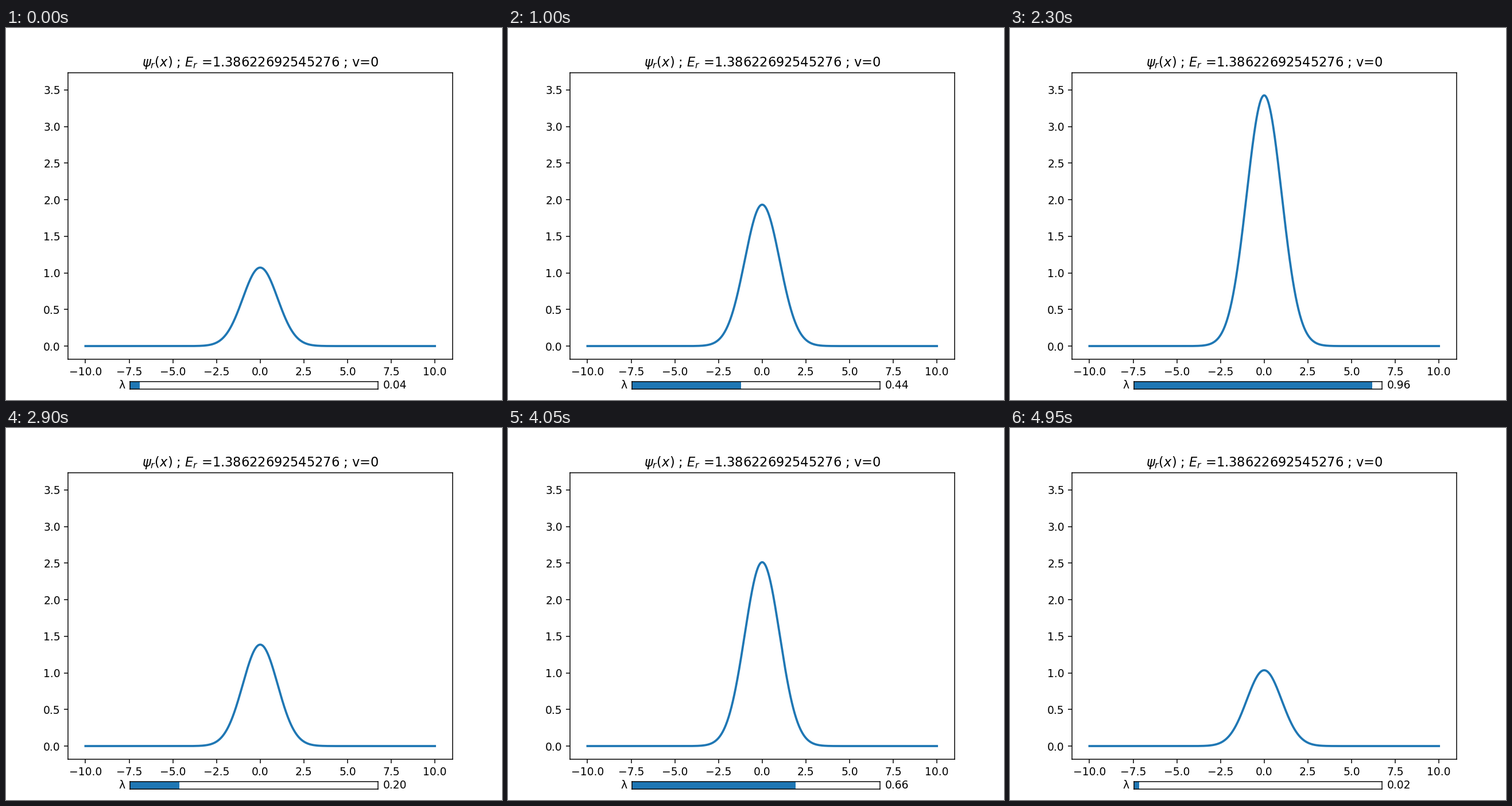
A matplotlib script for the animation above (5000 ms loop, 864 by 648 pixels).

```python
import numpy as np
import matplotlib.pyplot as plt
from matplotlib.animation import FuncAnimation

FRAMES, INTERVAL = 100, 50
SWEEP = 50  # frames per sweep of the coupling
SHIFT = np.sqrt(np.pi) / 2
ENERGY = "1.38622692545276"

plt.rcParams["font.family"] = "DejaVu Sans"

x = np.linspace(-10, 10, 1001)
ground = np.exp(-x**2 / 2)


def coupling(frame):
    return ((frame + 1) % SWEEP + 1) / SWEEP


def psi(lam):
    return (1 + SHIFT * lam) ** 2 * ground


fig, ax = plt.subplots(figsize=(6.4, 4.8), dpi=135)
fig.subplots_adjust(left=0.125, right=0.9, bottom=0.11, top=0.88)
peak = psi(1).max()
ax.set_xlim(-11, 11)
ax.set_ylim(-0.05 * peak, 1.05 * peak)
ax.set_title(rf"$\psi_r(x)$ ; $E_r$ ={ENERGY} ; v=0")
curve, = ax.plot(x, psi(coupling(0)), color="C0", lw=2)

# Slider track with its label and value
track = fig.add_axes([0.25, 0.03, 0.5, 0.02])
track.set(xlim=(0, 1), ylim=(0, 1), xticks=[], yticks=[])
bar = plt.Rectangle((0, 0), coupling(0), 1, facecolor="C0", linewidth=0)
track.add_patch(bar)
track.text(-0.02, 0.5, "λ", transform=track.transAxes, ha="right", va="center")
value = track.text(1.02, 0.5, "", transform=track.transAxes,
                   ha="left", va="center")


def update(frame):
    lam = coupling(frame)
    curve.set_ydata(psi(lam))
    bar.set_width(lam)
    value.set_text(f"{lam:.2f}")
    return curve, bar, value


anim = FuncAnimation(fig, update, frames=FRAMES, interval=INTERVAL,
                     repeat=True, repeat_delay=0)
plt.show()
```
